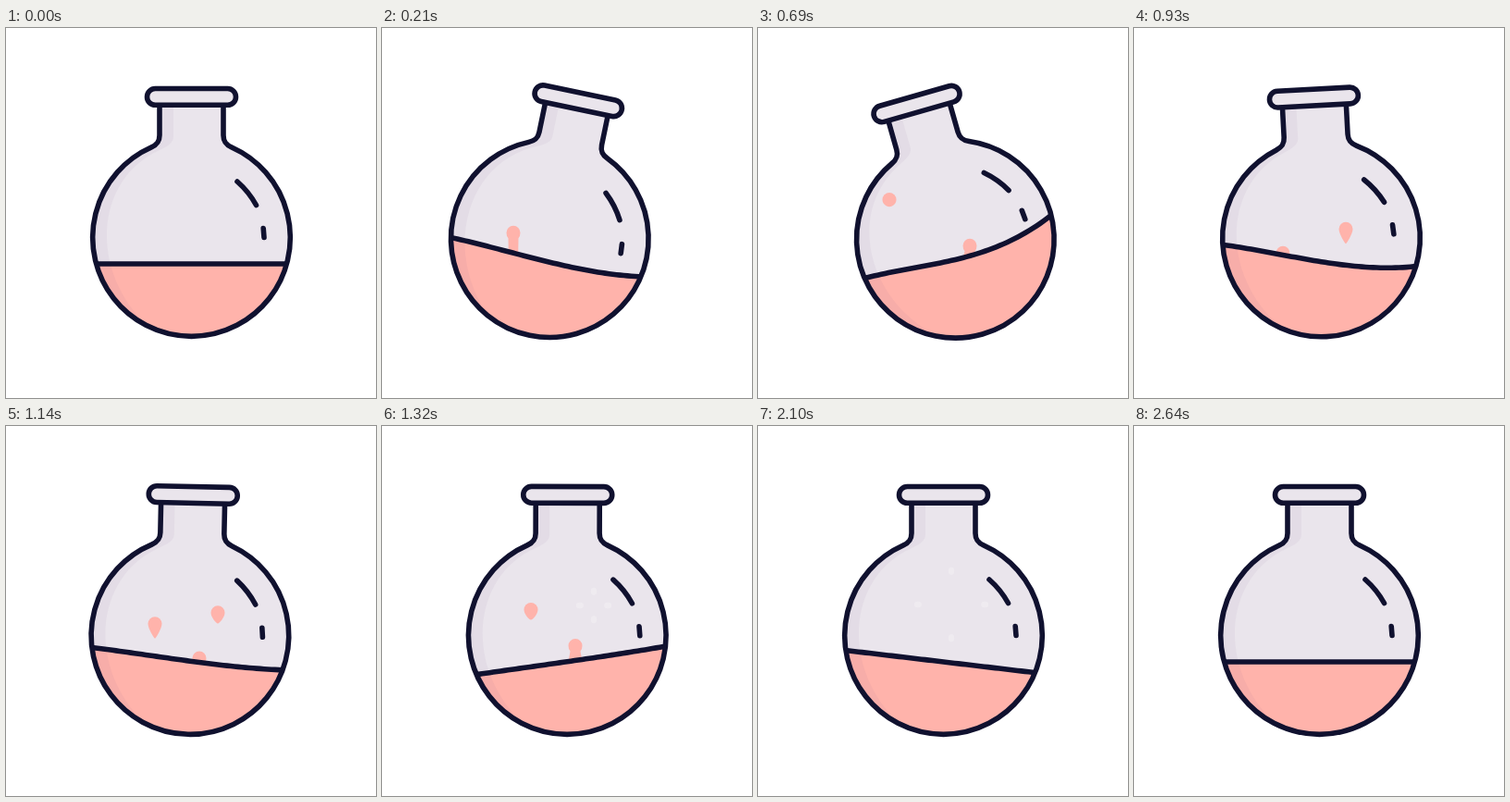
These frames come from a looping animation (400 px wide and 400 px high, 4.7 s). An HTML page:

```html
<!DOCTYPE html>
<html lang="en">
<head>
<meta charset="utf-8">
<title>Flask</title>
<style>
  html, body { margin: 0; width: 100%; height: 100%; overflow: hidden; background: #fff; }
  svg { display: block; width: 100%; height: 100%; }
  .ink { fill: none; stroke: #10112f; stroke-width: 5.6; stroke-linecap: round; stroke-linejoin: round; }
  .glass { fill: #eae5ec; }
  .pink { fill: #ffb3ab; }
  .shade { fill: #6e4678; opacity: .055; }
  .spark { fill: #fff; opacity: .25; }
</style>
</head>
<body>
<svg viewBox="0 0 400 400">
  <defs>
    <path id="body" d="M166 82V116C166 123 163 126.300 157 129A106.800 106.800 0 1 0 244 129C238 126.300 235 123 235 116V82Z"/>
    <rect id="cap" x="152.500" y="65.500" width="96" height="17.800" rx="8.900"/>
    <clipPath id="inside"><use href="#body" class="tilt"/></clipPath>
  </defs>
  <g class="tilt glass"><use href="#body"/></g>
  <g id="bubbles" class="pink"></g>
  <g clip-path="url(#inside)">
    <path id="liquid" class="pink"/>
    <g class="tilt">
      <path class="shade" d="M166 80H181V118C181 126 170 130 160 135C94 170 90 270 160 328L80 340V130Z"/>
    </g>
    <path id="surface" class="ink"/>
  </g>
  <g id="sparks" class="spark"></g>
  <g class="tilt ink">
    <use href="#body"/>
    <use href="#cap" class="glass"/>
    <path d="M250 166Q262.500 177 270.500 191.500M278.200 216.500L279 226.500"/>
  </g>
</svg>
<script>
const LOOP = 4700, CX = 200.5, CY = 226.3, LEVEL = 255;
const BEAT = 350;              // half a swing of the flask
const R = 7.5, RISE = 68;      // bubble radius and climb
const POP = 200, SPREAD = 40;  // spark life and reach

// turning points: time, value
const swing = [[0, 0], [BEAT, 17.8], [2 * BEAT, -16], [3 * BEAT, 1.5], [4 * BEAT, 0]];
const slosh = [[0, 0], [BEAT, 31], [2 * BEAT, -33], [1020, 21], [1400, -19], [2050, 12], [2640, 0]];

// two ways to climb: braking or steady
const brake = { life: 695, power: 2 };
const steady = { life: 914, power: 1 };
const bubbles = [
  { x: 142, birth: 20, top: 185.5, ...brake },
  { x: 229, birth: 331, top: 194, ...steady },
  { x: 161, birth: 840, top: 192, ...brake },
  { x: 209, birth: 1006, top: 193, ...steady }
];

const $ = id => document.getElementById(id);
const clamp = v => Math.max(0, Math.min(1, v));
const ease = p => (1 - Math.cos(Math.PI * clamp(p))) / 2;
const n = v => v.toFixed(2);

// each turn adds its own eased step
function at(turns, t) {
  return turns.slice(1).reduce((v, [end, to], i) => {
    const [begin, from] = turns[i];
    return v + (to - from) * ease((t - begin) / (end - begin));
  }, 0);
}

function flask(t) {
  const angle = at(swing, t);
  const away = ease(t / BEAT) - ease(t / BEAT - 2);
  return { angle, dx: -1.24 * angle - 7 * away, dy: 1.8 * away };
}

// tilt plus a hump that builds up and dies off; u runs from -1 to 1
function surfaceOf(t) {
  const tilt = at(slosh, t);
  const q = (t / 550) ** 2;
  const hump = 1.15 * q * Math.exp(1 - q);
  return u => LEVEL + tilt * u + hump * (9 * (u - u ** 3) - 4.5 - 12 * u * u);
}

function add(parent, tag, count) {
  return Array.from({ length: count }, () =>
    parent.appendChild(document.createElementNS('http://www.w3.org/2000/svg', tag)));
}

const drops = add($('bubbles'), 'path', bubbles.length);
const sparks = add($('sparks'), 'ellipse', bubbles.length * 4);
const tilted = document.querySelectorAll('.tilt');

// a round head on a foot that stands in the liquid, later on a pointed tail
function dropPath(x, y, top, level) {
  const p = (dx, dy) => `${n(x + dx)} ${n(y + dy)}`;
  const foot = 8 * clamp((y - top - 28) / 12);
  const head = `M${p(-R, 0)}A${R} ${R} 0 0 1 ${p(R, 0)}`;
  if (foot > 0) {
    const low = Math.max(level + 4 - y, R);
    return `${head}Q${p(R, 4)} ${p(5.5, 6)}L${p(foot, low)} ${p(-foot, low)} ` +
           `${p(-5.5, 6)}Q${p(-R, 4)} ${p(-R, 0)}Z`;
  }
  const tail = Math.min(16, R + .55 * (y - top));
  const sharp = clamp((tail - R) / 6);
  const w = 4.15 - 3.35 * sharp, side = 4.15 + sharp;
  return `${head}C${p(R, side)} ${p(w, tail)} ${p(0, tail)}` +
         `C${p(-w, tail)} ${p(-R, side)} ${p(-R, 0)}Z`;
}

function burst(dots, { x, top }, k) {
  dots.forEach((dot, j) => {
    dot.style.display = k >= 0 && k < 1 ? '' : 'none';
    const a = j * Math.PI / 2, r = SPREAD * k;
    dot.setAttribute('cx', n(x + r * Math.cos(a)));
    dot.setAttribute('cy', n(top + r * Math.sin(a)));
    dot.setAttribute('rx', j % 2 ? 3.2 : 4);
    dot.setAttribute('ry', j % 2 ? 4 : 3.2);
  });
}

function draw(t) {
  const { angle, dx, dy } = flask(t);
  const mid = CX + dx, height = surfaceOf(t);
  const move = `translate(${n(dx)} ${n(dy)}) rotate(${n(angle)} ${CX} ${CY})`;
  tilted.forEach(el => el.setAttribute('transform', move));

  const points = Array.from({ length: 55 }, (_, i) => {
    const u = (i - 27) / 25;
    return `${n(mid + u * 100)} ${n(height(u))}`;
  });
  const line = 'M' + points.join('L');
  $('surface').setAttribute('d', line);
  $('liquid').setAttribute('d', `${line}V350H${n(mid - 108)}Z`);

  bubbles.forEach((b, i) => {
    const age = t - b.birth;
    const y = b.top + RISE * clamp(1 - age / b.life) ** b.power;
    const alive = age >= 0 && age < b.life;
    drops[i].setAttribute('d', alive ? dropPath(b.x, y, b.top, height((b.x - mid) / 100)) : '');
    burst(sparks.slice(i * 4, i * 4 + 4), b, (age - b.life) / POP);
  });
}

const start = performance.now();
function tick(now) {
  draw(Math.max(0, now - start) % LOOP);
  requestAnimationFrame(tick);
}
draw(0);
requestAnimationFrame(tick);
</script>
</body>
</html>
```
